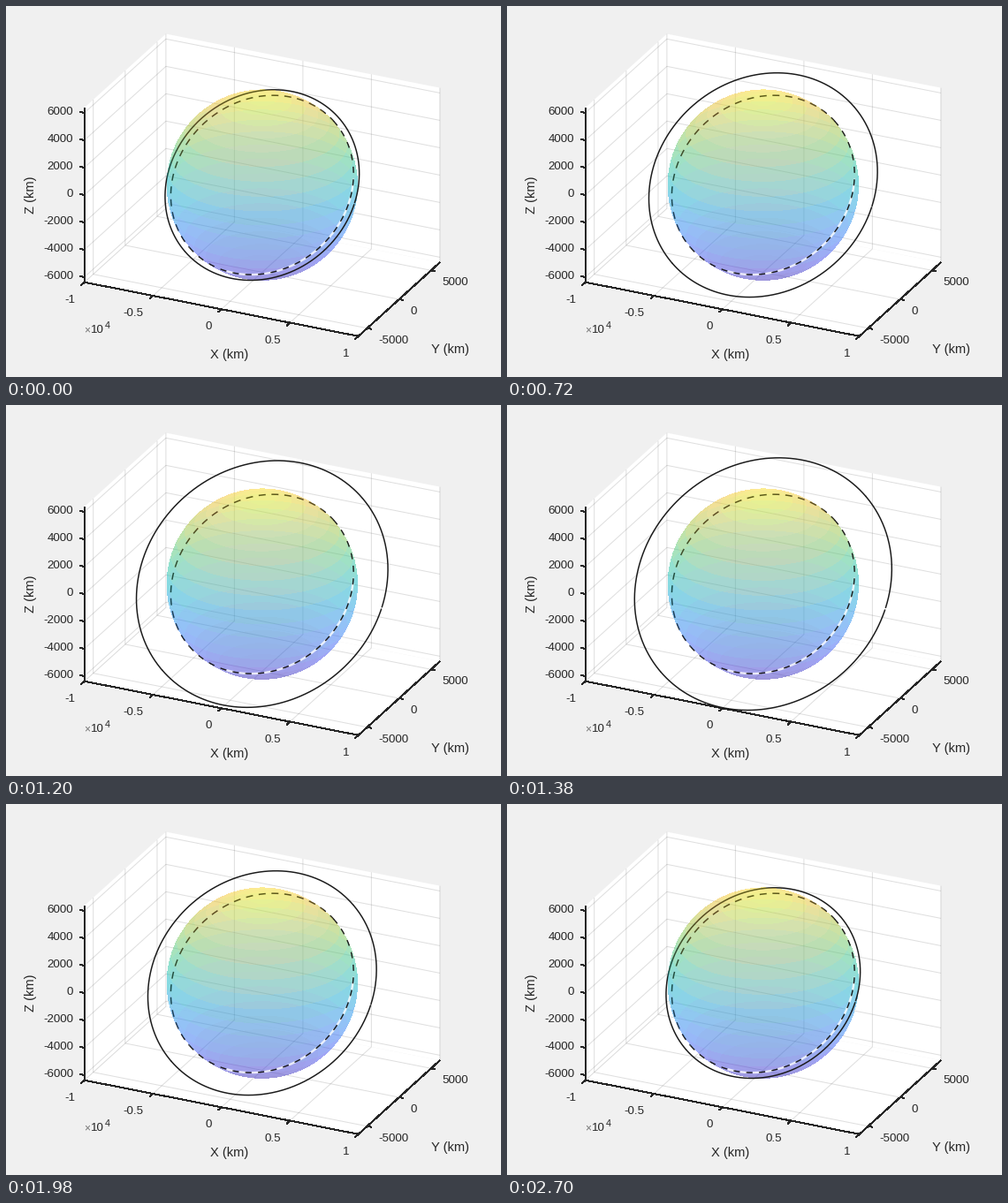
Recreate the animation shown at these times as a matplotlib script. Size 560 by 420 pixels, loop 2.73 s.

```python
import numpy as np
import matplotlib.pyplot as plt
from matplotlib.animation import FuncAnimation
from matplotlib.collections import LineCollection, PolyCollection

W, H, DPI = 560, 420, 100
CX, CY = 289.8, 202.65
FRAMES, INTERVAL = 91, 30
PEAK = FRAMES // 2
EARTH, MU = 6378.0, 398600.0
MAX_ALT = 2600
X_LIM = 1e4
AZ = EL = np.radians(25)
INCL = np.radians(46)
INK = (0.15, 0.15, 0.15)
LINE = (0.1, 0.1, 0.1)
FACE_ALPHA = 0.3

PARULA_POS = [0, .14, .25, .33, .4, .5, .6, .7, .8, .9, 1]
PARULA = np.array([
    (.242, .150, .660), (.281, .323, .958), (.179, .529, .968),
    (.154, .590, .922), (.108, .667, .873), (.070, .746, .726),
    (.270, .790, .550), (.504, .799, .348), (.784, .757, .180),
    (.990, .760, .230), (.977, .984, .080)])

VIEWER = np.array([np.sin(AZ) * np.cos(EL), -np.cos(AZ) * np.cos(EL), np.sin(EL)])


def px(pixels):
    """Size in points for a size in pixels."""
    return pixels * 72 / DPI


def parula(t):
    return np.stack([np.interp(t, PARULA_POS, PARULA[:, k]) for k in range(3)], -1)


class View:
    """Orthographic view that fits the axes box to the plot height."""

    def __init__(self, lim):
        self.lim = lim
        span = 2 * (lim * np.cos(EL)
                    + np.sin(EL) * (X_LIM * np.sin(AZ) + lim * np.cos(AZ)))
        self.scale = 342.3 / span

    def __call__(self, x, y, z):
        right = x * np.cos(AZ) + y * np.sin(AZ)
        up = z * np.cos(EL) + np.sin(EL) * (y * np.cos(AZ) - x * np.sin(AZ))
        return np.stack(np.broadcast_arrays(CX + self.scale * right,
                                            CY - self.scale * up), axis=-1)


def circle(radius, theta):
    r = 0.995 * radius
    s = r * np.sin(theta)
    return r * np.cos(theta), s * np.cos(INCL), s * np.sin(INCL)


# Angle at which the inclined circle passes behind the globe
u = np.array(circle(1, 0.0)) @ VIEWER
v = np.array(circle(1, np.pi / 2)) @ VIEWER
LIMB = np.arctan2(-u, v) % np.pi

fig = plt.figure(figsize=(W / DPI, H / DPI), dpi=DPI, facecolor="#f0f0f0")
ax = fig.add_axes([0, 0, 1, 1])


def text(x, y, s, size=13.33, ha="center", color=INK, **kw):
    return ax.text(x, y, s, fontsize=px(size), ha=ha, va="center",
                   color=color, family="Liberation Sans", zorder=8, **kw)


def exponent(x, y):
    return [text(x - 1, y + 1, "×", 12, "left", color="0.45"),
            text(x + 7.5, y, "10", ha="left"),
            text(x + 23.5, y - 5, "4", 10.7, "left")]


def tick_name(value, tens):
    return f"{value / 1e4:g}" if tens else f"{value:.0f}"


def walls_and_grid(view, x_ticks, y_ticks, z_ticks):
    a, b = X_LIM, view.lim
    walls = [[(-a, -b, -b), (a, -b, -b), (a, b, -b), (-a, b, -b)],
             [(-a, -b, -b), (-a, b, -b), (-a, b, b), (-a, -b, b)],
             [(-a, b, -b), (a, b, -b), (a, b, b), (-a, b, b)]]
    paths = [[(t, -b, -b), (t, b, -b), (t, b, b)] for t in x_ticks]
    paths += [[(a, t, -b), (-a, t, -b), (-a, t, b)] for t in y_ticks]
    paths += [[(-a, -b, t), (-a, b, t), (a, b, t)] for t in z_ticks]
    flat = lambda shape: [view(*p) for p in shape]
    return [ax.add_collection(PolyCollection([flat(w) for w in walls],
                                             facecolors="white", zorder=0)),
            ax.add_collection(LineCollection([flat(p) for p in paths],
                                             colors=[(*INK, 0.15)],
                                             linewidths=px(1), zorder=1))]


def rulers(view, x_ticks, y_ticks, z_ticks):
    a, b = X_LIM, view.lim
    tens = b > 9000
    left, front, right = view(-a, -b, -b), view(a, -b, -b), view(a, b, -b)
    top = view(-a, -b, b)
    x_dir, y_dir = (front - left), (right - front)
    x_dir, y_dir = x_dir / np.hypot(*x_dir), y_dir / np.hypot(*y_dir)
    lines = [[top, left, front, right]]
    out = []

    def tick(p, d):
        lines.append([p, p + 5 * d])

    for t in x_ticks:
        p = view(t, -b, -b)
        tick(p, -y_dir)
        out.append(text(p[0] - 10.4, p[1] + 20, tick_name(t, True), ha="right"))
    for t in y_ticks:
        p = view(a, t, -b)
        tick(p, x_dir)
        out.append(text(p[0] + 12.6, p[1] + 14, tick_name(t, tens), ha="left"))
    for t in z_ticks:
        p = view(-a, -b, t)
        tick(p, -x_dir)
        out.append(text(p[0] - 12.5, p[1] - 0.8, tick_name(t, tens), ha="right"))

    mx, my, mz = (left + front) / 2, (front + right) / 2, (left + top) / 2
    out += [text(mx[0] + 8.5, mx[1] + 51.7, "X (km)", 14.67),
            text(my[0] + 58, my[1] + 57, "Y (km)", 14.67),
            text(mz[0] - 61, mz[1], "Z (km)", 14.67, rotation=90)]
    out += exponent(left[0], left[1] + 54)
    if tens:
        out += exponent(top[0], top[1] - 12)
        out += exponent(right[0] + 14, right[1] - 8)
    out.append(ax.add_collection(LineCollection(lines, colors=[INK],
                                                linewidths=px(1), zorder=1.5,
                                                antialiaseds=False)))
    return out


def globe(view, bands=20):
    """Far and near halves of the globe as translucent latitude bands."""
    radius = 0.992 * EARTH
    x, y = np.meshgrid(np.arange(W) + 0.5, np.arange(H) + 0.5)
    right, up = (x - CX) / view.scale, (CY - y) / view.scale
    depth2 = radius ** 2 - right ** 2 - up ** 2
    depth = np.sqrt(np.maximum(depth2, 0))
    layers = []
    for side, zorder in ((-1, 2), (1, 4)):
        z = up * np.cos(EL) + side * depth * np.sin(EL)
        lat = np.arcsin(np.clip(z / radius, -1, 1))
        step = np.pi / bands
        low = np.sin(np.floor(lat / step) * step)
        rgba = np.dstack([parula((low + 1) / 2), FACE_ALPHA * (depth2 > 0)])
        layers.append(ax.imshow(rgba, extent=(0, W, H, 0), zorder=zorder,
                                interpolation="nearest", aspect="auto"))
    return layers


def curve(points, width=1.5, color=LINE, zorder=6, **kw):
    return ax.plot(points[:, 0], points[:, 1], color=color, lw=px(width),
                   zorder=zorder, dash_capstyle="butt",
                   solid_capstyle="butt", **kw)[0]


def ground_track(view):
    far = np.linspace(LIMB, LIMB + np.pi, 200)
    near = np.linspace(LIMB - np.pi, LIMB, 200)
    glint = np.radians(np.linspace(-95, 15, 150))
    track = lambda theta: view(*circle(EARTH, theta))
    return [curve(track(far), 1.5, zorder=3, ls=(0, (5.3, 4.4))),
            curve(track(glint), 2.4, "white", 5, ls=(0, (3.6, 2.4)), alpha=0.8),
            curve(track(near), 1.4, zorder=5.5, ls=(0, (5, 5.3)))]


def scene(view, *ticks):
    return (walls_and_grid(view, *ticks) + rulers(view, *ticks)
            + globe(view) + ground_track(view))


half = np.arange(-1e4, 1.1e4, 5e3)
tight, wide = View(EARTH), View(1e4)
tight_scene = scene(tight, half, half[1:-1], np.arange(-6000, 6001, 2000))
wide_scene = scene(wide, half, half, half)

ring_far = curve(np.zeros((1, 2)), zorder=3)
ring_near = curve(np.zeros((1, 2)), zorder=6)

ax.set_xlim(0, W)
ax.set_ylim(H, 0)
ax.axis("off")


def draw(i):
    altitude = 400 + 50 * (PEAK - abs(i - PEAK))
    radius = EARTH + altitude
    # The box jumps to rounded limits once the orbit rises above it
    outside = altitude > MAX_ALT
    view = wide if outside else tight
    for artist in tight_scene:
        artist.set_visible(not outside)
    for artist in wide_scene:
        artist.set_visible(outside)

    # Ten-second steps leave the orbit slightly open
    period = 2 * np.pi * np.sqrt(radius ** 3 / MU)
    gap = 2.5 * 2 * np.pi * (period % 10) / period
    far = np.linspace(LIMB - 0.005, LIMB + np.pi + 0.005, 240)
    near = np.concatenate([np.linspace(LIMB - np.pi, -gap, 180), [np.nan],
                           np.linspace(0, LIMB, 90)])
    ring_far.set_data(*view(*circle(radius, far)).T)
    ring_near.set_data(*view(*circle(radius, near)).T)
    return ring_far, ring_near


anim = FuncAnimation(fig, draw, frames=FRAMES, interval=INTERVAL,
                     repeat=True, repeat_delay=0, blit=False)
plt.show()
```
